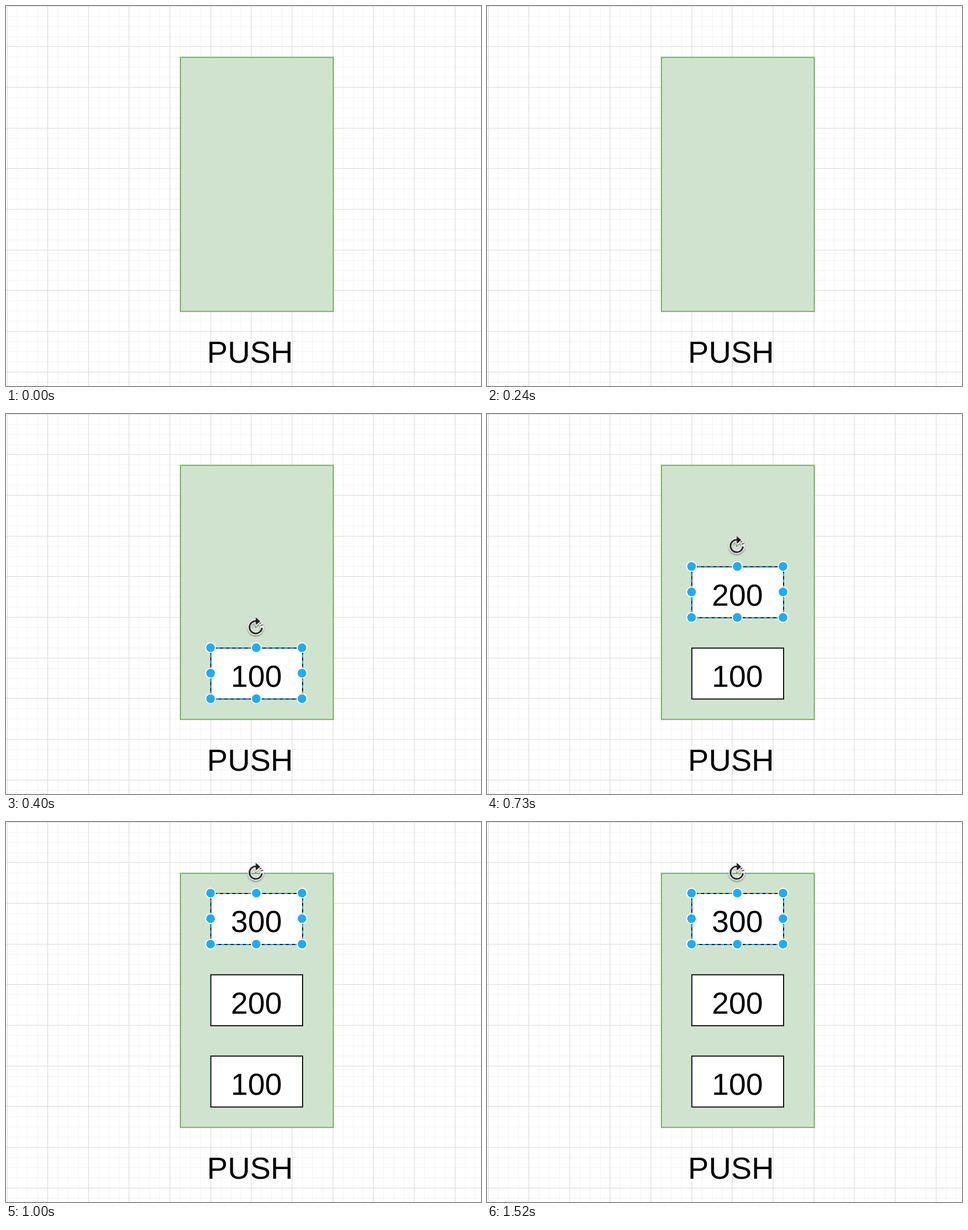
Write an HTML page that moves like this. It is 836x670 px and loops after 1.87 s.

```html
<!DOCTYPE html>
<html lang="en">
<head>
<meta charset="utf-8">
<title>Stack push</title>
<style>
  html, body { margin: 0; width: 100%; height: 100%; overflow: hidden; background: #fff; }
  svg { display: block; }
  text { font-family: Helvetica, "Liberation Sans", Arial, sans-serif; text-anchor: middle; }
</style>
</head>
<body>
<svg id="stage" width="836" height="670" viewBox="0 0 836 670">
  <defs>
    <filter id="shadow" x="-50%" y="-50%" width="200%" height="200%">
      <feDropShadow dx="0" dy="2" stdDeviation="1.6" flood-color="#000" flood-opacity=".4"/>
    </filter>
    <g id="rotate" fill="none">
      <g filter="url(#shadow)" stroke="#f4f4f4" stroke-width="6">
        <circle r="11"/>
        <path d="M1-14L6-10L1-6Z" stroke-linejoin="round"/>
      </g>
      <path d="M1-11A11 11 0 1 0 11 1" stroke="#2b2b2b" stroke-width="3"/>
      <path d="M0-17.5L8-10.5L0-4Z" fill="#222"/>
      <path d="M6.5-6.5L10-8M8.5-3L13-4.5" stroke="#555" stroke-width="1.8"/>
      <circle r="1" fill="#555"/>
    </g>
  </defs>
  <g id="grid"></g>
  <rect x="307" y="90.5" width="269" height="448" fill="#d0e3cf" stroke="#6fa953" stroke-width="1.8"/>
  <text x="429.5" y="629" font-size="54.5">PUSH</text>
  <g id="stack"></g>
  <g id="selection"></g>
</svg>
<script>
const SVG_NS = 'http://www.w3.org/2000/svg';
const byId = id => document.getElementById(id);

function add(parent, tag, attrs, text = '') {
  const node = document.createElementNS(SVG_NS, tag);
  for (const [key, value] of Object.entries(attrs)) node.setAttribute(key, value);
  node.textContent = text;
  return parent.appendChild(node);
}

// Grid: every fourth line is a major one.
const CELL = 71.65;
function gridPath(divisions) {
  let d = '';
  for (let i = 0; i < 12 * divisions; i++) {
    const offset = i * CELL / divisions;
    d += `M${Math.floor(2 + offset) + .5} 0V670M0 ${Math.floor(.3 + offset) + .5}H836`;
  }
  return d;
}
add(byId('grid'), 'path', { d: gridPath(4), stroke: '#f4f4f4' });
add(byId('grid'), 'path', { d: gridPath(1), stroke: '#dadada' });

// Boxes, bottom of the stack first.
const BOX = { x: 360.5, y: 412.7, width: 161.5, height: 89.8 };
const STEP = 2 * CELL;
const items = [100, 200, 300].map((value, i) => {
  const group = add(byId('stack'), 'g', { transform: `translate(0 ${-i * STEP})` });
  add(group, 'rect', { ...BOX, fill: '#fff', stroke: '#000', 'stroke-width': 1.8 });
  add(group, 'text', { x: 440.7, y: 481, 'font-size': 53.75 }, value);
  return group;
});

// Selection frame with handles and the rotate icon.
const selection = byId('selection');
add(selection, 'rect', { ...BOX, fill: 'none', stroke: '#20a5f5', 'stroke-width': 2, 'stroke-dasharray': '5.4 5.4' });
for (const x of [360, 440.5, 521]) {
  for (const y of [412, 457, 502]) {
    if (x === 440.5 && y === 457) continue;
    add(selection, 'circle', { cx: x, cy: y, r: 8.6, fill: '#26aaee', stroke: '#fff', 'stroke-width': 1.8 });
  }
}
add(selection, 'use', { href: '#rotate', x: 439.5, y: 376 });

const LOOP = 1870;
const pushTimes = [400, 730, 1000];

function draw(now) {
  const t = now % LOOP;
  const count = pushTimes.filter(time => t >= time).length;
  items.forEach((item, i) => item.setAttribute('visibility', i < count ? 'visible' : 'hidden'));
  selection.setAttribute('visibility', count ? 'visible' : 'hidden');
  selection.setAttribute('transform', `translate(0 ${-(count - 1) * STEP})`);
}

let start;
function tick(now) {
  start ??= now;
  draw(now - start);
  requestAnimationFrame(tick);
}
draw(0);
requestAnimationFrame(tick);
</script>
</body>
</html>
```
